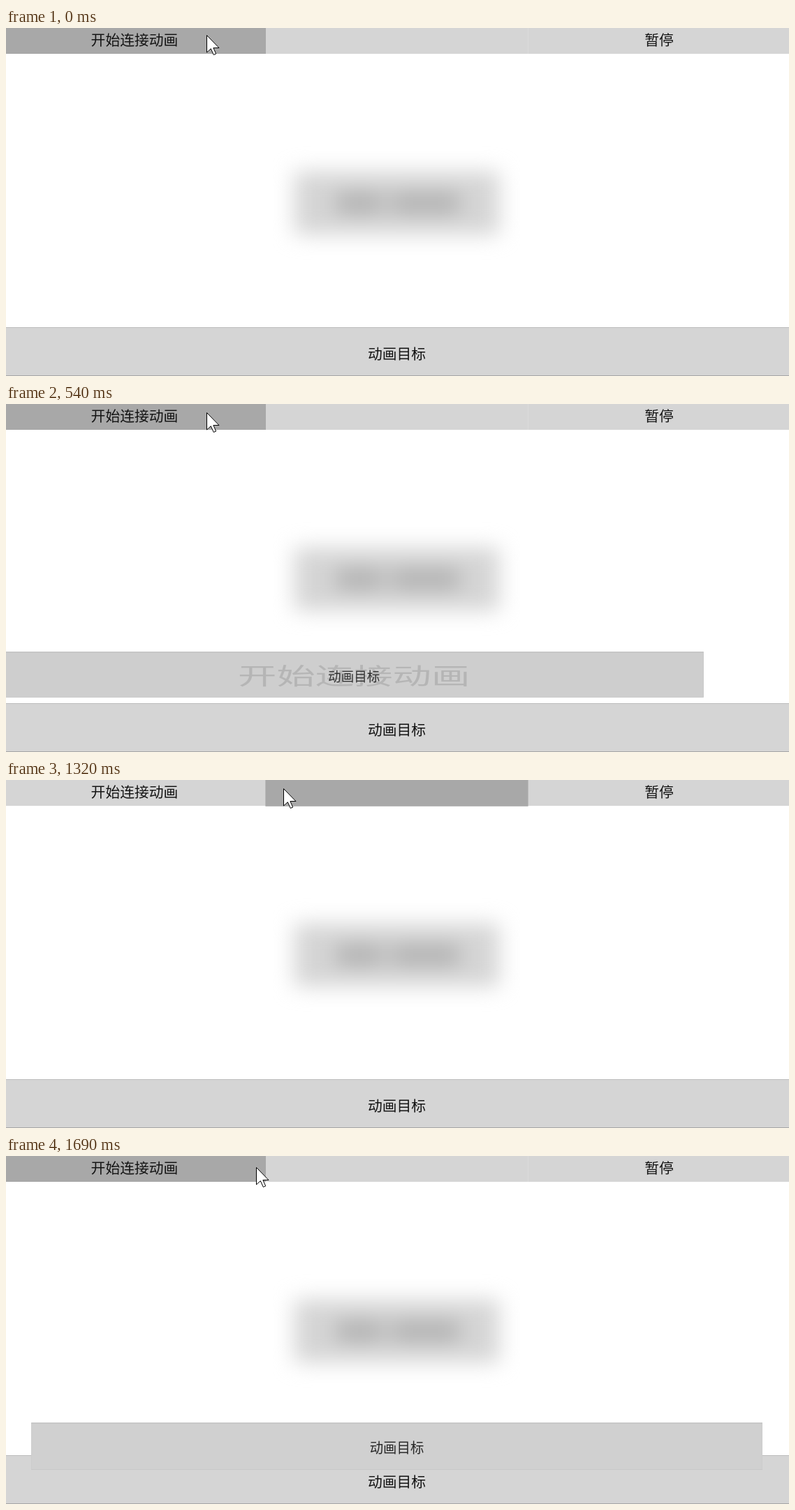
Animation, 1121 px wide and 499 px high, one loop 1770 ms. Source, as an HTML page with a canvas:

```html
<!DOCTYPE html>
<html lang="zh">
<head>
<meta charset="utf-8">
<style>
  html, body { margin: 0; width: 1121px; height: 499px; overflow: hidden; background: #fff; }
  canvas { position: absolute; left: 0; top: 0; }
  .frosted {
    position: absolute; left: 413px; top: 206px; width: 293px; height: 90px;
    background: #d5d5d5; filter: blur(15px);
  }
  .frosted i { position: absolute; top: 32px; height: 26px; background: #adadad; }
</style>
</head>
<body>
<div class="frosted"><i style="left:60px;width:67px"></i><i style="left:139px;width:97px"></i></div>
<canvas id="stage" width="1121" height="499"></canvas>
<script>
const ctx = document.getElementById('stage').getContext('2d');
const LOOP = 1770;
const NORMAL = '#d5d5d5', HOVER = '#a8a8a8';

// Screen refreshes: the picture holds between these times.
const TICKS = [0, 80, 160, 230, 310, 390, 460, 540, 620, 690, 770, 850, 930,
  1000, 1320, 1390, 1460, 1540, 1620, 1690];

// Pointer path: time, x, y
const POINTER = [[0, 287, 10], [80, 287, 12], [620, 287, 12], [690, 306, 12],
  [930, 397, 12], [1320, 397, 12], [1390, 397, 13], [1540, 397, 13], [1690, 358, 16]];

const buttons = [
  { x: -4, y: -4, w: 376, h: 41, label: '开始连接动画', base: 29.3 },
  { x: 372, y: -4, w: 375, h: 41, label: '', base: 29.3 },
  { x: 748, y: -4, w: 374, h: 41, label: '暂停', base: 29.3 }
];
const target = { x: -2, y: 429, w: 1123, h: 70, label: '动画目标', base: 45.8, edge: '#bcbcbc' };
const flights = [
  { start: 133.5, duration: 620, from: buttons[0] },
  { start: 1276.5, duration: 586, from: buttons[1] }
];

const lerp = (a, b, p) => a + (b - a) * p;
const easeInOut = t => t < 0.5 ? 4 * t ** 3 : 1 - 4 * (1 - t) ** 3;

function drawPanel(panel, fill, box = panel, alpha = 1) {
  ctx.save();
  ctx.globalAlpha = alpha;
  ctx.translate(box.x, box.y);
  ctx.scale(box.w / panel.w, box.h / panel.h);
  ctx.fillStyle = fill;
  ctx.fillRect(0, 0, panel.w, panel.h);
  if (panel.edge) {
    ctx.fillStyle = panel.edge;
    ctx.fillRect(0, 0, panel.w, 1);
  }
  ctx.fillStyle = '#141414';
  ctx.font = '20.8px "Noto Sans CJK SC", "Noto Sans CJK", sans-serif';
  ctx.textAlign = 'center';
  ctx.fillText(panel.label, panel.w / 2, panel.base);
  ctx.restore();
}

function drawFlight({ start, duration, from }, time) {
  const t = (time - start) / duration;
  if (t < 0 || t > 1) return;
  const p = easeInOut(t);
  const box = {};
  for (const key of ['x', 'y', 'w', 'h']) box[key] = lerp(from[key], target[key], p);
  box.y -= 30 * p ** 3 * (1 - p);
  drawPanel(from, HOVER, box);
  drawPanel(target, NORMAL, box, p);
}

function pointerAt(time) {
  const next = POINTER.findIndex(k => k[0] > time);
  if (next < 0) return POINTER[POINTER.length - 1].slice(1);
  const a = POINTER[next - 1], b = POINTER[next];
  const p = (time - a[0]) / (b[0] - a[0]);
  return [lerp(a[1], b[1], p), lerp(a[2], b[2], p)];
}

const arrow = new Path2D('M0 0V24.5L5.8 19.2L9.8 28L13.2 26.5L9.4 18H17.5Z');

function drawPointer(x, y) {
  ctx.save();
  ctx.translate(Math.round(x) + 0.5, Math.round(y) + 0.5);
  ctx.fillStyle = '#fff';
  ctx.strokeStyle = '#000';
  ctx.fill(arrow);
  ctx.stroke(arrow);
  ctx.restore();
}

function render(now) {
  const elapsed = now % LOOP;
  const time = TICKS.filter(tick => tick <= elapsed).pop();
  const [x, y] = pointerAt(time);
  const hovered = x < 372 ? 0 : 1;
  ctx.clearRect(0, 0, 1121, 499);
  ctx.fillStyle = '#dadada';
  ctx.fillRect(747, 0, 1, 37);
  buttons.forEach((button, i) => drawPanel(button, i === hovered ? HOVER : NORMAL));
  drawPanel(target, NORMAL);
  flights.forEach(flight => drawFlight(flight, time));
  ctx.fillStyle = '#a6a6a6';
  ctx.fillRect(0, 498, 1121, 1);
  drawPointer(x, y);
  requestAnimationFrame(render);
}
requestAnimationFrame(render);
</script>
</body>
</html>
```
